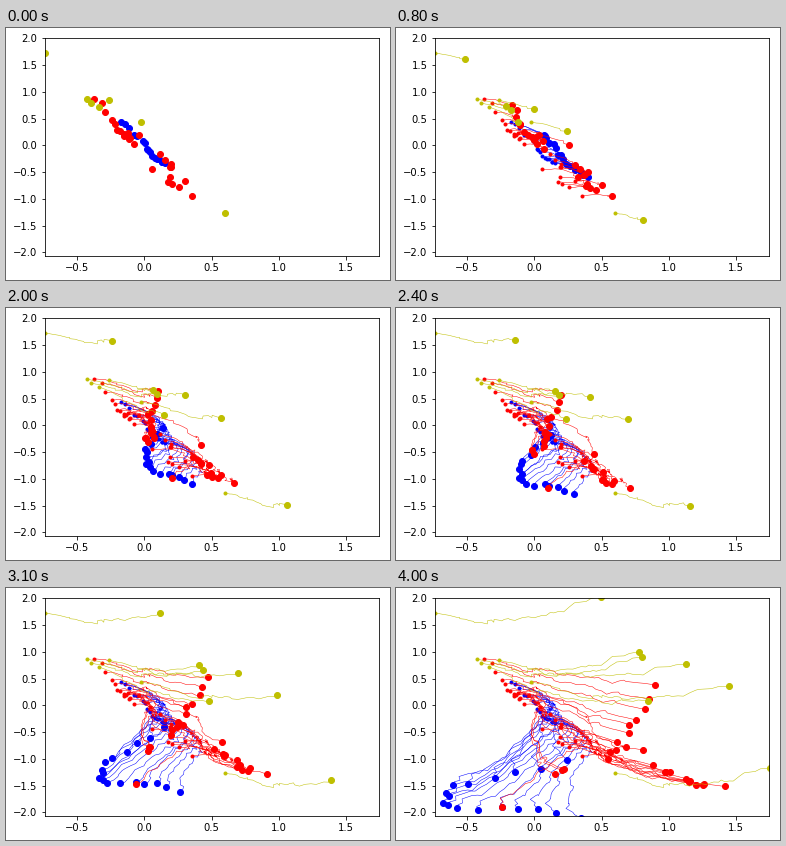
These frames come from a looping animation (384 px wide and 252 px high, 4.1 s). A matplotlib script:

```python
import numpy as np
import matplotlib.pyplot as plt
from matplotlib.animation import FuncAnimation
from matplotlib.ticker import MultipleLocator

W, H, DPI = 384, 252, 72
FRAMES, INTERVAL = 41, 100
LEFT, BOTTOM, WIDTH, HEIGHT = 38.6, 24.38, 334.8, 217.44
XLIM, YLIM = (-0.742, 1.748), (-2.059, 2.0)
KEY_FRAMES = [0, 14, 27, 40]
T = np.arange(FRAMES)
U = T / T[-1]
rng = np.random.default_rng(7)


def wander(sx, sy, keep=0.6):
    """Zigzag that starts at zero and keeps pulling back to it."""
    steps = rng.normal(size=(FRAMES, 2)) * (sx, sy)
    out = np.zeros((FRAMES, 2))
    for i in range(1, FRAMES):
        out[i] = keep * out[i - 1] + steps[i]
    return out


def ribbon(count, knots, *shapes, bunch=1, spread=(1.5, 3)):
    """Particles strung along a curve that bends through four shapes."""
    s = np.linspace(0, 1, count) ** bunch
    keys = np.array([[np.interp(s, knots, axis) for axis in np.transpose(shape)]
                     for shape in shapes])
    fit = np.polyfit(KEY_FRAMES, keys.reshape(4, -1), 3)
    pts = sum(c * T[:, None] ** p for c, p in zip(fit, (3, 2, 1, 0)))
    pts = pts.reshape(FRAMES, 2, count).transpose(2, 0, 1)
    first, last = rng.normal(size=(2, count, 1, 2))
    u = U[None, :, None]
    return pts + first * spread[0] * (1 - u) + last * spread[1] * u


def sweep(starts, ends, sag=15):
    """Particles that cross from start to end, sagging on the way."""
    p = (U - 0.7 * U ** 2 * (1 - U))[None, :, None]
    a, b = (np.array(pts, float)[:, None] for pts in (starts, ends))
    return a + (b - a) * p + np.array([0, sag]) * np.sin(np.pi * p)


def to_data(px):
    u = (px[..., 0] - LEFT) / WIDTH
    v = (H - px[..., 1] - BOTTOM) / HEIGHT
    x = XLIM[0] + u * (XLIM[1] - XLIM[0])
    y = YLIM[0] + v * (YLIM[1] - YLIM[0])
    return np.stack([x, y], axis=-1)


# Shapes are in stage pixels, from the upper left end of the string.
blue = ribbon(17, [0, 0.33, 0.6, 1],
              [(115, 94), (137, 114), (148, 128), (160, 136)],
              [(155, 114), (153, 130), (165, 147), (194, 161)],
              [(154, 134), (110, 170), (116, 183), (175, 193)],
              [(167, 175), (46, 203), (53, 219), (182, 228)])
red_high = ribbon(11, [0, 0.4, 1],
                  [(90, 72), (109, 97), (126, 115)],
                  [(135, 81), (134, 103), (147, 124)],
                  [(181, 88), (166, 120), (152, 141)],
                  [(259, 97), (238, 144), (210, 170)])
red_low = ribbon(12, [0, 0.1, 1],
                 [(137, 107), (156, 133), (181, 162)],
                 [(190, 127), (184, 149), (217, 168)],
                 [(207, 152), (195, 163), (236, 184)],
                 [(247, 164), (258, 186), (321, 203)], spread=(4, 5))
red_stray = ribbon(4, [0, 1],
                   [(120, 107), (149, 140)],
                   [(143, 117), (184, 158)],
                   [(139, 150), (145, 190)],
                   [(169, 182), (109, 224)], bunch=5)
yellow = sweep([(39, 25), (81, 71), (85, 75), (93, 79), (103, 72), (135, 94), (219, 185)],
               [(205, 10), (243, 65), (246, 70), (252, 113), (290, 77), (333, 99), (373, 181)])

fig = plt.figure(figsize=(W / DPI, H / DPI), dpi=DPI, facecolor="white")
ax = fig.add_axes([LEFT / W, BOTTOM / H, WIDTH / W, HEIGHT / H])
ax.set(xlim=XLIM, ylim=YLIM)
ax.xaxis.set_major_locator(MultipleLocator(0.5))
ax.yaxis.set_major_locator(MultipleLocator(0.5))

shared = wander(1.7, 1.2)
swarms = []
for color, group in [("b", blue), ("r", red_high), ("r", red_low),
                     ("r", red_stray), ("y", yellow)]:
    paths = to_data(np.array([g + shared + wander(0.3, 0.3) for g in group]))
    trails = [ax.plot([], [], color=color, lw=0.5)[0] for _ in paths]
    ax.plot(*paths[:, 0].T, "o", color=color, ms=3)
    heads, = ax.plot([], [], "o", color=color, ms=6)
    swarms.append((paths, trails, heads))


def draw(i):
    artists = []
    for paths, trails, heads in swarms:
        for path, trail in zip(paths, trails):
            trail.set_data(*path[:i + 1].T)
        heads.set_data(*paths[:, i].T)
        artists += trails + [heads]
    return artists


anim = FuncAnimation(fig, draw, frames=FRAMES, interval=INTERVAL,
                     repeat=True, repeat_delay=0)
plt.show()
```
